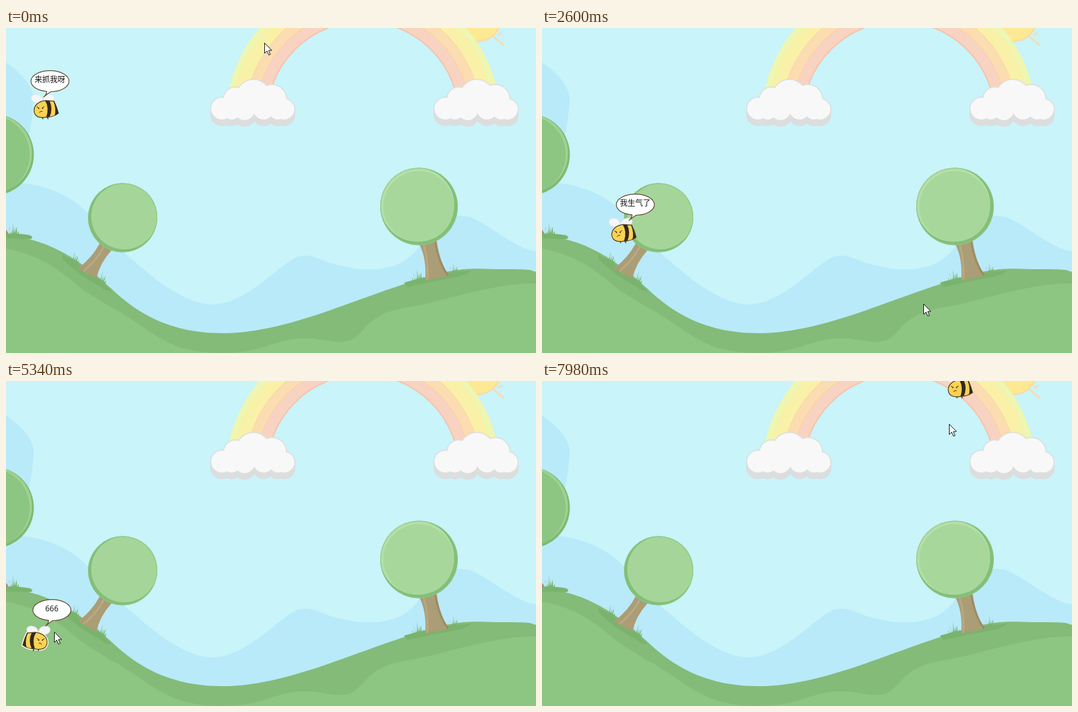
Animation, 827 px wide and 508 px high, one loop 8000 ms. Source, as an HTML page:

```html
<!DOCTYPE html>
<html lang="zh">
<head>
<meta charset="utf-8">
<title>Bee chase</title>
<style>
  html, body { margin: 0; width: 100%; height: 100%; overflow: hidden; background: #c8f4fa; }
  svg { display: block; width: 100vw; height: 100vh; }
  text { font: 12px "Open Sans", "Noto Sans CJK SC", "Noto Sans CJK", sans-serif; text-anchor: middle; }
</style>
</head>
<body>
<svg viewBox="0 0 827 508" preserveAspectRatio="none">
  <defs>
    <clipPath id="upper"><rect width="827" height="100"/></clipPath>
    <g id="puffs">
      <circle cx="337" cy="126" r="17"/><circle cx="358" cy="111" r="18"/>
      <circle cx="386" cy="107" r="26"/><circle cx="415" cy="111" r="22"/>
      <circle cx="434" cy="127" r="16"/><circle cx="352" cy="129" r="14"/>
      <circle cx="372" cy="128" r="16"/><circle cx="402" cy="127" r="16"/>
      <circle cx="424" cy="130" r="13"/>
    </g>
    <g id="cloud">
      <g fill="#dcdddd" stroke="#dcdddd" stroke-width="3">
        <use href="#puffs"/><use href="#puffs" y="9"/>
      </g>
      <use href="#puffs" fill="#f8f8f8"/>
    </g>
    <path id="body" d="M6 28C5 18 14 12 24 11L37 12Q41 20 44 31Q36 37 25 37Q8 40 6 28Z"/>
  </defs>

  <rect width="827" height="508" fill="#c8f4fa"/>
  <g fill="#b9eaf9">
    <path d="M0 54Q45 85 43 115Q40 160 28 200L0 244Z"/>
    <path d="M0 240C60 242 100 262 125 287S170 340 190 356S270 432 322 432S425 372 450 360
             S490 365 520 371C560 382 622 384 648 336S690 294 715 294S790 345 827 349V508H0Z"/>
  </g>

  <g fill="#fde893">
    <circle cx="735" cy="-17" r="38" stroke="#fbd9a0" stroke-width="2"/>
    <path d="M760 13L777 27M767 10L774 8" stroke="#f7dcb4" stroke-width="3"/>
  </g>
  <g id="rainbow" fill="none" clip-path="url(#upper)"></g>
  <use href="#cloud"/>
  <use href="#cloud" x="348.5"/>

  <path d="M0 326C70 326 130 375 165 408S250 477 338 477C430 477 530 430 622 400S720 377 775 377
           S815 379 827 381V508H0Z" fill="#84bb78"/>
  <path d="M0 345C45 352 80 375 105 397S165 435 200 458S260 506 330 508S420 485 465 485
           S530 505 558 471S620 440 660 430S770 399 827 399V508H0Z" fill="#8dc582"/>
  <g id="grass" fill="#7ab36d">
    <path d="M0 322Q15 320 38 324Q44 328 38 330L0 329Z"/>
    <path d="M88 354Q125 372 162 408L164 412Q154 411 145 403Q115 388 88 361Z"/>
    <path d="M621 398Q660 386 727 379Q718 386 704 389Q665 396 627 405Z"/>
    <path d="M0 315L4 322H0Z" fill="#ab8f70"/>
  </g>

  <g fill="#ab9d76">
    <path d="M147 335L165 347Q146 368 141 392L112 376Q135 359 147 335Z"/>
    <path d="M645 338L672 333Q677 368 692 387L654 395Q657 362 645 338Z"/>
  </g>
  <g fill="none" stroke-width="3">
    <path d="M153 341Q142 363 121 380M651 337Q660 364 657 394" stroke="#b7a983"/>
    <path d="M670 334Q675 368 690 387" stroke="#9b8d67"/>
  </g>

  <circle cx="-20" cy="198" r="63.5" fill="#7fba74"/>
  <circle cx="-21" cy="196" r="61.5" fill="#a0d193"/>
  <circle cx="-24" cy="198" r="61" fill="#8dc582"/>
  <circle cx="182" cy="296.5" r="54" fill="#82bf78"/>
  <circle cx="184.5" cy="294.5" r="51.5" fill="#a6d599"/>
  <circle cx="182" cy="296.5" r="53.5" fill="none" stroke="#8dc682"/>
  <circle cx="644.5" cy="279" r="60.5" fill="#83bf78"/>
  <circle cx="641.8" cy="276.3" r="57.5" fill="#b4dfa8"/>
  <circle cx="644" cy="279" r="55" fill="#a8d79b"/>
  <circle cx="644.5" cy="279" r="60" fill="none" stroke="#8fc785"/>

  <g id="bee">
    <use id="halo" href="#body" fill="#fff" stroke="#fff" stroke-width="4"/>
    <g fill="#f5f6f7" stroke="#dfe3e6">
      <ellipse cx="10" cy="8" rx="9" ry="6.5" transform="rotate(15 10 8)"/>
      <ellipse cx="29" cy="8" rx="9" ry="6.5" transform="rotate(-20 29 8)"/>
    </g>
    <path d="M18 36L20 40M26 36L28 40" stroke="#3a2d22" stroke-width="1.3"/>
    <use href="#body" fill="#fcd251"/>
    <path d="M23 11Q30 22 25 37L30 37Q36 24 30 11.500ZM36 12H37Q41 20 44 31L38 35Q41 24 36 12Z" fill="#33281f"/>
    <use href="#body" fill="none" stroke="#4a3820" stroke-width="1.2"/>
    <path d="M10 21L14 23M22 20.500L18 23M14 30Q16 27 19 28" fill="none" stroke="#33281f"/>
    <path d="M12.500 23.500h1.500M18.500 23.500h1.500" stroke="#33281f" stroke-width="1.500"/>
  </g>

  <g id="bubble">
    <path d="M25.500 33.200C10 31.500 1 25 1 17C1 8 14 .7 31 .7C47 .7 60.300 8 60.300 17C60.300 27 46 33.700 32 33.500Q25 38 20.500 42Q25.500 38 25.500 33.200Z"
          fill="#fff" stroke="#59482f" stroke-width="1.2"/>
    <text id="words" x="30.5" y="19" fill="#111"></text>
  </g>

  <path id="cursor" d="M.5.5V16.500L4.200 13L7 19.300L9.500 18.200L6.800 12H11.800Z" fill="#fff" stroke="#111"/>
</svg>

<script>
const $ = id => document.getElementById(id);
const LOOP = 8000;
const SWING = 950;              // one swing of the bee, ms
const REST = 100, TRAVEL = 550; // the pointer pauses, then chases

// Bands from outside in: outer radius, fill, line along the inner edge
const bands = [[213, '#eef6b1', '#f4eb9f'], [202, '#faf1a9', '#f6d08f'],
               [183, '#fcdcb1', '#f3c59b'], [167, '#f9d3c1', '#f4c3ac']];
const ring = (r, width, color) =>
  `<circle cx="557" cy="139.5" r="${r}" stroke="${color}" stroke-width="${width}"/>`;
$('rainbow').innerHTML = bands.map(([outer, fill, line], i) => {
  const inner = i < 3 ? bands[i + 1][0] : 150;
  return ring((outer + inner) / 2, outer - inner + 1, fill) + ring(inner, 2, line);
}).join('');

function tuft(x, y, tilt) {
  let d = '';
  for (let i = -3; i <= 3; i++) {
    const h = 21 - Math.abs(i) * 3 - (i & 1) * 4;
    d += `M${i * 2 - 2} 2Q${i * 2} ${-h / 2} ${i * 3} ${-h}Q${i * 3} ${-h / 2} ${i * 2 + 2} 2Z`;
  }
  return `<path transform="translate(${x} ${y}) rotate(${tilt})" d="${d}"/>`;
}
$('grass').innerHTML += tuft(11, 325, 0) + tuft(104, 369, 10) + tuft(146, 400, 15)
  + tuft(643, 397, -5) + tuft(698, 387, 0);

// A stop of the bee: start time, bubble corner, words, swing phase, where the pointer catches it
const stop = (start, x, y, words, phase, hit) => ({ start, x, y, words, phase, hit });
const stops = [
  stop(-50, 38, 66, '来抓我呀', 2.66, [58, 125]),
  stop(750, 34, 170, '哎呀妈呀', 3, [72, 263]),
  stop(1640, 617, 392, '来抓我呀', -1.77, [595, 431]),
  stop(2510, 115, 259, '我生气了', 3.42, [121, 319]),
  stop(3650, 249, -34, '哎呀妈呀', 2, [271, 65]),
  stop(4590, 41, 341, '666', -.12, [75, 392]),
  stop(5480, 698, 100, '哎呀妈呀', -.91, [671, 160]),
  stop(6300, 348, 264, '666', 3, [302, 350]),
  stop(7330, 619, -58, '来抓我呀', -2.17, [635, 67])
];
const origin = [403, 23];

const smooth = s => { s = Math.max(0, Math.min(1, s)); return s * s * (3 - 2 * s); };
const move = (id, x, y, flip = 1) =>
  $(id).setAttribute('transform', `translate(${x} ${y}) scale(${flip} 1)`);

function draw(t) {
  const i = stops.filter(s => s.start <= t).length - 1;
  const { start, x, y, words, phase, hit } = stops[i];
  const age = t - start;

  const turn = age / SWING * 2 * Math.PI;
  const right = Math.cos(turn + phase) > 0;
  const bx = x - 2 + 13 * Math.sin(turn + phase);
  const by = y + 42.5 - 6.5 * Math.cos(turn);
  move('bee', right ? bx + 44 : bx, by, right ? -1 : 1);
  $('halo').setAttribute('opacity', right ? 1 : 0);

  move('bubble', x, y);
  $('words').textContent = words;

  const from = i ? stops[i - 1].hit : origin;
  const p = smooth((age - REST) / TRAVEL);
  move('cursor', ...from.map((v, k) => v + (hit[k] - v) * p));
}

const begin = performance.now();
function tick(now) {
  draw(Math.max(0, now - begin) % LOOP);
  requestAnimationFrame(tick);
}
draw(0);
requestAnimationFrame(tick);
</script>
</body>
</html>
```
